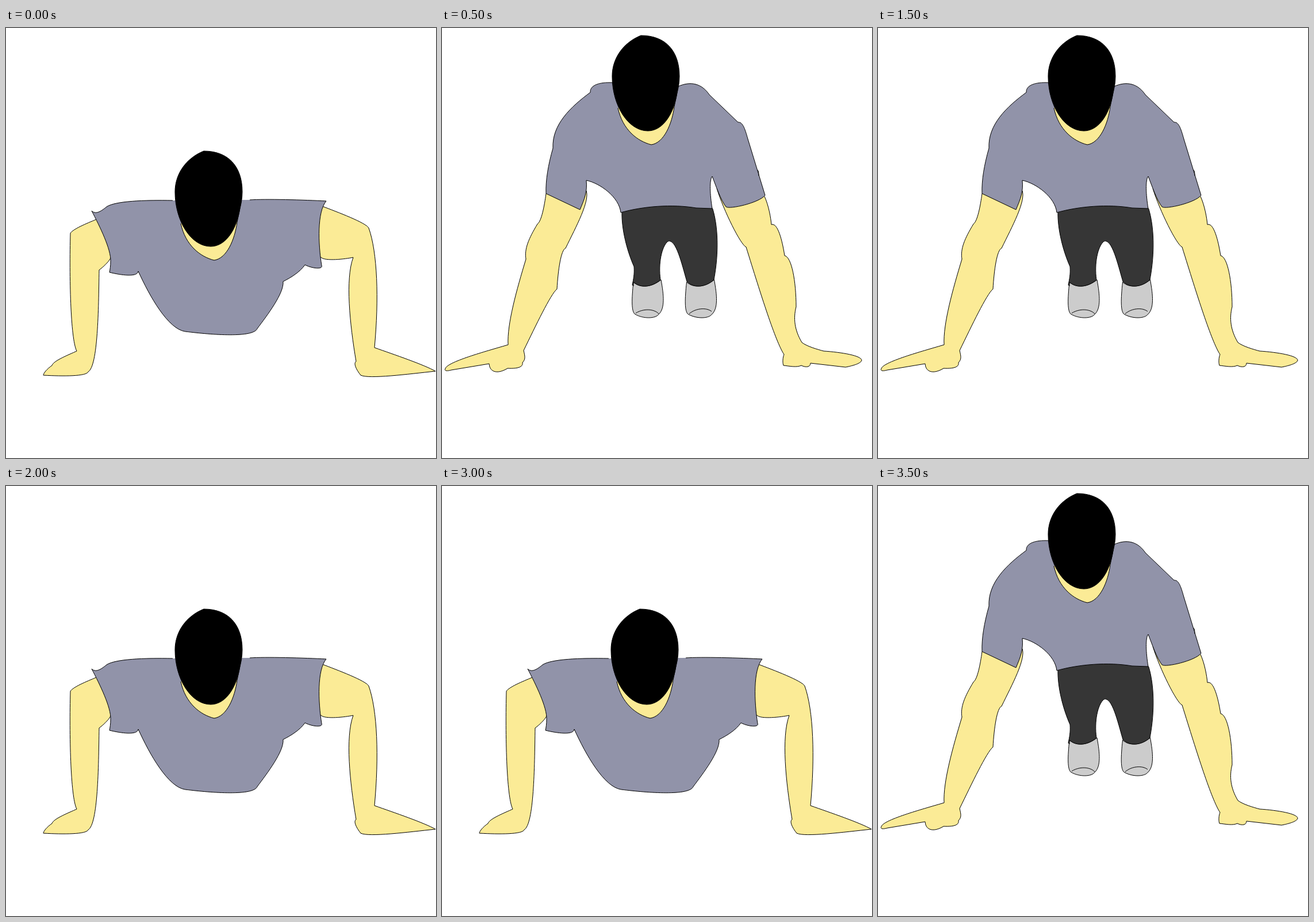
These frames come from a looping animation (748x748 px, 4 s). An HTML page:

```html
<!DOCTYPE html>
<html lang="en">
<head>
<meta charset="utf-8">
<title>Push-ups</title>
<style>
  html, body { margin: 0; width: 100%; height: 100%; overflow: hidden; background: #fff; }
  svg { display: block; width: 100vw; height: 100vh; }
  path { stroke: #000; stroke-width: 1; }
  .skin { fill: #fbeb96; }
  .shirt { fill: #9193a9; }
  .pants { fill: #363636; }
  .shoe { fill: #ccc; }
  .line { fill: none; }
  .pose { animation: swap 1s step-end infinite; }
  #up { animation-delay: -.5s; }
  @keyframes swap {
    0% { visibility: visible; }
    50%, 100% { visibility: hidden; }
  }
</style>
</head>
<body>
<svg viewBox="0 0 748 748">
  <defs>
    <g id="head">
      <path class="skin" d="M304 340C312 378 338 398 362 404C384 401 398 368 402 338L407 313"/>
      <path d="M344 214C387 214 411 241 411 285C411 296 409 306 407 314C401 351 382 380 356 380C322 380 294 336 294 285C294 253 314 226 344 214Z"/>
    </g>
    <path id="shoe" class="shoe" d="M333 442C330 470 329 494 336 498C350 506 371 506 377 498C388 488 386 465 381 438C365 451 345 453 333 442Z"/>
  </defs>

  <!-- limbs and pants run on under the shirt -->
  <g id="down" class="pose">
    <path class="skin" d="M157 333C140 340 116 350 112 357C110 430 112 540 123 562C110 568 82 579 80 587C70 594 65 601 65 604C100 606 140 606 143 598C160 588 161 490 162 421C170 415 177 408 181 402L190 380"/>
    <path class="skin" d="M550 310C576 320 627 339 631 348C646 390 649 470 641 556C675 568 728 586 747 597C700 602 631 611 617 604C609 594 604 583 609 580C598 515 590 437 604 399C590 402 555 406 548 399L520 380"/>
    <path class="shirt" d="M290 300C240 299 190 301 175 311C163 321 155 324 149 318C163 345 183 385 182 406C182 414 181 420 180 425C200 430 229 434 230 423C250 467 282 524 312 528C360 534 430 539 437 523C455 499 484 461 482 441C496 434 512 424 520 412C534 419 552 420 549 413C543 375 541 320 557 301C520 299 450 297 424 299"/>
    <use href="#head"/>
  </g>

  <g id="up" class="pose">
    <use href="#shoe"/>
    <use href="#shoe" x="92.5"/>
    <path class="line" d="M337 496C350 488 368 488 377 497M430 497C442 487 460 486 469 493"/>
    <path class="pants" d="M313 319C312 350 322 388 334 415C335 428 333 437 331 447L333 449L333 442C345 453 365 451 380 438C376 410 382 380 393 371C407 366 417 410 426 441C440 454 460 450 473 438C482 390 480 345 471 315L460 300H320"/>
    <path class="skin" d="M181 288C178 310 173 336 166 341C151 366 143 384 146 402C130 455 113 515 115 551C85 560 10 580 6 592C3 597 9 597 16 595L82 584C83 600 98 602 114 592C136 593 141 588 140 582C146 576 144 570 142 561C163 518 189 463 200 454C202 420 207 386 215 383C234 344 257 302 251 283"/>
    <path class="skin" d="M561 293C568 308 572 330 573 342C584 338 592 370 596 396C608 398 616 440 616 485C611 505 613 525 626 547C635 554 653 559 664 562C695 564 730 570 730 578C729 584 712 588 702 590L641 583C641 590 633 591 625 587C617 591 604 588 594 587C592 582 593 572 595 568C580 545 555 465 529 381C520 378 490 318 478 279"/>
    <path class="shirt" d="M296 95C275 94 257 99 258 112C224 137 191 168 193 209C185 237 180 265 181 288L240 316C248 297 253 285 251 265C275 270 308 294 311 321C350 310 400 306 442 313L470 314C466 290 465 264 470 258C476 273 485 300 494 311C500 316 552 304 562 291L532 193C527 175 523 163 515 164L465 116C453 98 434 91 410 102"/>
    <path class="line" d="M549 247C551 249 551 254 551 257"/>
    <use href="#head" x="2" y="-201"/>
  </g>
</svg>
</body>
</html>
```
